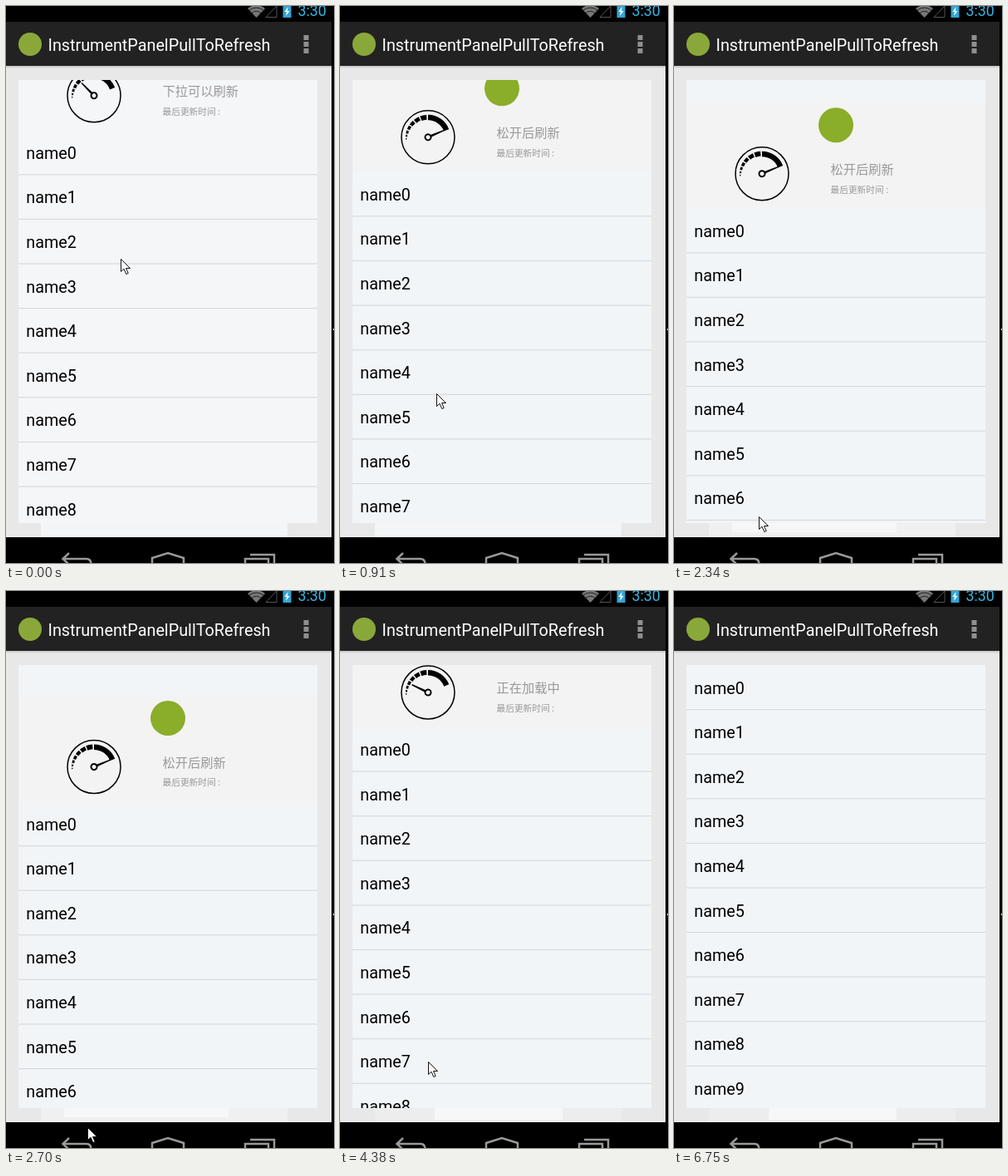
These frames come from a looping animation (395x670 px, 7.84 s). An HTML page:

```html
<!DOCTYPE html>
<html lang="zh">
<head>
<meta charset="utf-8">
<title>Pull to refresh</title>
<style>
  html, body { margin: 0; width: 100%; height: 100%; overflow: hidden; background: #000; }
  svg { display: block; width: 395px; height: 670px; }
  text { font-family: Roboto, sans-serif; font-size: 19.8px; }
  .hint { font-family: "Noto Sans CJK SC", "Noto Sans CJK", sans-serif; fill: #999; }
  .line { fill: none; stroke: #999; stroke-width: 2.5; }
</style>
</head>
<body>
<svg viewBox="0 0 395 670">
  <defs>
    <clipPath id="panelClip"><rect x="15" y="89" width="360" height="533"/></clipPath>
    <linearGradient id="shadow" x2="0" y2="1">
      <stop stop-color="#c0c0c0"/><stop offset="1" stop-color="#e8e8e8"/>
    </linearGradient>
  </defs>

  <!-- status bar -->
  <rect width="395" height="670"/>
  <path d="M291 3Q301.500 -5 312 3L301.500 14Z" fill="#777"/>
  <path d="M293 5Q301.500 -1 310 5M296 8.500Q301.500 4 307 8.500" fill="none" stroke="#222"/>
  <path d="M313 13.500H326V0Z" fill="none" stroke="#555"/>
  <path d="M333.500 0H343.500V14H333.500Z" fill="#33a5d5"/>
  <path d="M339.500 1L335.500 7H338L337 12L341.500 6H339Z" fill="#fff"/>
  <text x="351.500" y="12" style="font-size:17.800px" fill="#33b5e5">3:30</text>

  <!-- action bar and page -->
  <rect y="19" width="392" height="53" fill="#222"/>
  <rect y="72" width="392" height="567" fill="#e8e8e8"/>
  <rect y="72" width="392" height="3" fill="url(#shadow)"/>
  <circle cx="29" cy="46" r="14" fill="#8aa83a"/>
  <text x="50.500" y="53.500" fill="#fff">InstrumentPanelPullToRefresh</text>
  <path d="M358.500 35h6v6h-6zM358.500 43h6v6h-6zM358.500 51h6v6h-6z" fill="#8f8f8f"/>
  <rect x="394" y="388" width="1" height="2" fill="#ddd"/>

  <!-- strip below the list -->
  <rect id="stripBase" x="42" y="622" width="297" height="17"/>
  <rect id="stripGlow" y="622" fill="#f7f7f7"/>

  <g clip-path="url(#panelClip)">
    <rect id="panel" x="15" y="89" width="360" height="533"/>
    <g id="content">
      <rect id="header" x="15" y="-38.500" width="360" height="127.500"/>
      <circle cx="195" cy="-11" r="21" fill="#8aad2a"/>
      <g id="gauge" transform="translate(106 47.500)">
        <circle r="32" fill="none" stroke="#000" stroke-width="1.500"/>
        <g id="needle">
          <path d="M-3 -1.400L-21.500 -.700V.700L-3 1.400Z"/>
          <circle r="3.500" fill="#f3f3f3" stroke="#000" stroke-width="2"/>
        </g>
      </g>
      <text id="hint" class="hint" x="188.500" y="47.500" style="font-size:15.250px"></text>
      <text class="hint" x="188.500" y="70.300" style="font-size:10.700px">最后更新时间 :</text>
      <g id="rows"></g>
    </g>
  </g>

  <!-- navigation bar -->
  <rect y="639" width="395" height="31"/>
  <g class="line" transform="translate(0 1)">
    <path d="M76 657L68.500 664L76 671M69 664H97Q102.500 664 102.500 671"/>
    <path d="M176 672V663L195 657L214 663V672"/>
    <path d="M294 659H323V672M288 672V664H316V672"/>
  </g>

  <path id="cursor" d="M.500 .500V15.500L4 12.200L6.800 18.500L9.200 17.500L6.500 11.500H11.500Z" fill="#fff" stroke="#111"/>
</svg>
<script>
const LOOP = 7840, RELEASE = 2850, SWING_START = 3140, SWING = 680, FINISH = 5700;
const MAX_TURN = 157, LOADING_OFFSET = 74.5, ROW = 53.6;
const get = id => document.getElementById(id);
const clamp = (v, lo, hi) => Math.min(hi, Math.max(lo, v));
const mix = (a, b, p) => a + (b - a) * p;
const easeOut = p => 1 - (1 - p) ** 2;
const progress = (t, start, length) => clamp((t - start) / length, 0, 1);

// time, x, y
const pointer = [
  [0, 138, 304], [420, 125, 386], [1440, 107, 553], [1640, 104, 579],
  [1980, 103, 606], [2260, 103, 606], [2340, 102, 614], [2700, 98, 645],
  [RELEASE, 98, 645], [3150, 111, 576], [3660, 110, 569], [4470, 106, 566],
  [5270, 103, 556], [5630, 100, 544], [5900, 82, 552], [6370, 82, 552], [6740, 334, 655]
];

// time, list offset while dragging
const pull = [
  [0, 60.2], [420, 85.3], [1440, 137.3], [1980, 152], [2260, 152], [2340, 154.2], [2700, 164]
];

function sample(keys, t) {
  const i = keys.findIndex(key => key[0] > t);
  if (i < 0) return keys.at(-1).slice(1);
  const [a, b] = [keys[i - 1], keys[i]];
  const p = progress(t, a[0], b[0] - a[0]);
  return a.slice(1).map((value, k) => mix(value, b[k + 1], p));
}

function offsetAt(t) {
  const [dragged] = sample(pull, t);
  if (t < RELEASE) return dragged;
  if (t < FINISH) return mix(dragged, LOADING_OFFSET, easeOut(progress(t, RELEASE, 210)));
  return LOADING_OFFSET * (1 - easeOut(progress(t, FINISH, 200)));
}

function turnAt(t, offset) {
  if (t < RELEASE) return clamp(45 + (offset - 60) * 2.32, 0, MAX_TURN);
  const phase = Math.max(0, t - SWING_START) / SWING % 2;
  return MAX_TURN * (1 - Math.abs(1 - phase)) - 2;
}

function add(parent, name, attributes, text = "") {
  const node = document.createElementNS("http://www.w3.org/2000/svg", name);
  for (const key in attributes) node.setAttribute(key, attributes[key]);
  node.textContent = text;
  parent.append(node);
  return node;
}

function arc(from, to, thickness) {
  const r = 27 - thickness / 2;
  const point = deg => {
    const a = deg * Math.PI / 180;
    return `${r * Math.cos(a)} ${-r * Math.sin(a)}`;
  };
  const node = add(get("gauge"), "path", {
    d: `M${point(from)}A${r} ${r} 0 0 1 ${point(to)}`,
    fill: "none", stroke: "#000", "stroke-width": thickness
  });
  get("gauge").insertBefore(node, get("needle"));
}

arc(90, 21, 6.5);
for (let i = 0, end = 94; i < 7; i++) {
  const span = 17 - i * 2.3;
  arc(end + span, end, 5.8 - i * 0.75);
  end += span + 3.5;
}

for (let i = 0; i < 10; i++) {
  const top = 89 + i * ROW;
  add(get("rows"), "text", { x: 24.3, y: top + 34.5 }, "name" + i);
  add(get("rows"), "rect", { x: 15, y: top + 53, width: 360, height: 1.2, fill: "#d7dbde" });
}

function drawStrip(t) {
  const glow = get("stripGlow");
  const left = t < RELEASE ? 70 : 114;
  get("stripBase").setAttribute("fill", t < 2260 ? "#f4f5f6" : t < RELEASE ? "#f0f0f0" : "#ededed");
  glow.setAttribute("x", left);
  glow.setAttribute("width", 268 - left);
  glow.setAttribute("height", t < RELEASE ? 11 : 14);
  glow.setAttribute("visibility", t < 2260 ? "hidden" : "visible");
}

function draw(now) {
  const t = now % LOOP;
  const offset = offsetAt(t);
  const [x, y] = sample(pointer, t);
  get("content").setAttribute("transform", `translate(0 ${offset})`);
  get("needle").setAttribute("transform", `rotate(${turnAt(t, offset)})`);
  get("hint").textContent = t >= RELEASE ? "正在加载中" : offset < 108 ? "下拉可以刷新" : "松开后刷新";
  get("panel").setAttribute("fill", t < 30 ? "#f5f6f8" : "#f1f5f8");
  get("header").setAttribute("fill", t < 30 ? "#f5f6f8" : "#f3f3f3");
  get("cursor").setAttribute("transform", `translate(${Math.round(x)} ${Math.round(y)})`);
  get("cursor").setAttribute("visibility", t < 6740 ? "visible" : "hidden");
  drawStrip(t);
}

const start = performance.now();
function frame() {
  draw(performance.now() - start);
  requestAnimationFrame(frame);
}
frame();
</script>
</body>
</html>
```
